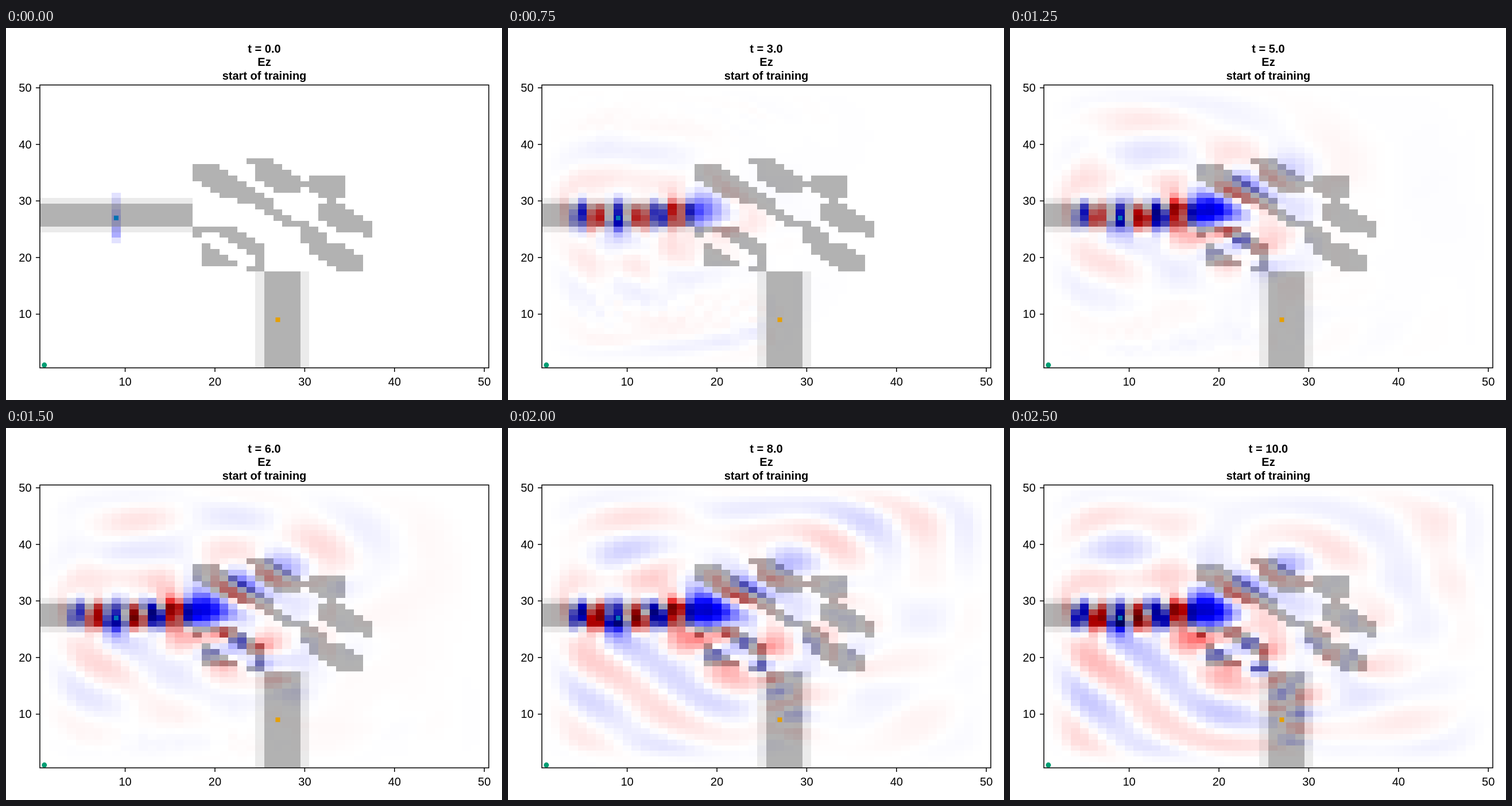
An HTML page with a canvas that plays this animation: 864x648 px, repeating every 2.56 s.

```html
<!DOCTYPE html>
<html>
<head>
<meta charset="utf-8">
<style>
  html, body { margin: 0; width: 100%; height: 100%; overflow: hidden; background: #fff; }
  canvas { display: block; }
</style>
</head>
<body>
<canvas id="stage" width="864" height="648"></canvas>
<script>
// 2D wave simulation (Ez polarisation) of a waveguide bend on a 50 x 50 grid.
const SIZE = 50, PAD = 5, N = SIZE + 2 * PAD;
const STEPS = 24;              // time steps per period
const SPEED = 10.3 / STEPS;    // cells per step in the background
const FRAMES = 41, LOOP = 2560;
const CORE = 0.3, CLAD = 0.078;  // shade of the material overlay

// Islands of the design region: top row, then the cell span of each row going down.
const islands = [
  [36, '18-20 18-21 18-22 19-23 20-24 21-25 23-26 25-26 26-27 27-28 28-30 30-31 30-32 30-32 31-34 31-35 32-36 33-36 34-36'],
  [37, '24-26 25-27 25-28 25-29 26-30 27-29'],
  [34, '31-34 31-34 31-34 32-34 33-33 32-34 32-35 32-36 33-37 34-37 37-37'],
  [25, '18-22 21-23 22-24 23-25 24-25 25-25 25-25 24-25'],
  [24, '18-18'],
  [22, '19-19 19-20 19-21 19-22']
];

const at = (x, y) => (y + PAD - 1) * N + x + PAD - 1;
const shade = new Float32Array(N * N);
const damp = new Float32Array(N * N);
const eps = new Float32Array(N * N);

const guide = d => d < 2 ? CORE : d < 3 ? CLAD : 0;
for (let y = 1 - PAD; y <= SIZE + PAD; y++) {
  for (let x = 1 - PAD; x <= SIZE + PAD; x++) {
    const depth = p => Math.max(0, 4.5 - Math.min(p, SIZE + 1 - p));
    damp[at(x, y)] = Math.exp(-3 * (depth(x) + depth(y)) / STEPS);
    if (x <= 17) shade[at(x, y)] = guide(Math.abs(y - 27.5));
    if (y <= 17) shade[at(x, y)] = guide(Math.abs(x - 27.5));
  }
}
for (const [top, rows] of islands) {
  rows.split(' ').forEach((span, i) => {
    const [a, b] = span.split('-').map(Number);
    for (let x = a; x <= b; x++) shade[at(x, top - i)] = CORE;
  });
}
shade.forEach((s, k) => eps[k] = 1 + 4.44 * s / CORE);

function simulate() {
  const e = new Float32Array(N * N), hx = new Float32Array(N * N), hy = new Float32Array(N * N);
  const perFrame = STEPS / 4, fields = [];
  for (let n = 0; fields.length < FRAMES; n++) {
    for (let k = 0; k < N * N - N; k++) {
      hx[k] = (hx[k] - SPEED * (e[k + N] - e[k])) * damp[k];
      hy[k] = (hy[k] + SPEED * (e[k + 1] - e[k])) * damp[k];
    }
    for (let k = N; k < N * N; k++) {
      e[k] = (e[k] + SPEED / eps[k] * (hy[k] - hy[k - 1] - hx[k] + hx[k - N])) * damp[k];
    }
    for (let d = -4; d <= 4; d++) {
      const k = at(9, 27 + d);
      e[k] += 15 / STEPS / eps[k] * Math.exp(-d * d / 6.7) * Math.cos(2 * Math.PI * n / STEPS);
    }
    if (n % perFrame === 0) fields.push(e.slice());
  }
  return fields;
}

// Diverging map: dark blue, blue, white, red, dark red.
function color(v) {
  const m = Math.min(1, Math.abs(v));
  const pale = Math.max(0, 1 - 2 * m);
  const full = 1 - Math.max(0, m - 0.5) * (v > 0 ? 1.4 : 1);
  return v > 0 ? [pale, pale, full] : [full, pale, pale];
}

const fields = simulate();
const cells = document.createElement('canvas');
cells.width = cells.height = SIZE;
const cellCtx = cells.getContext('2d');
const image = cellCtx.createImageData(SIZE, SIZE);
const ctx = document.getElementById('stage').getContext('2d');

const box = { left: 59, top: 99.3, width: 782, height: 492.7 };
const px = x => box.left + (x - 0.5) * box.width / SIZE;
const py = y => box.top + box.height - (y - 0.5) * box.height / SIZE;

function text(string, x, y, align, weight = '') {
  ctx.font = weight + ' 20px "Liberation Sans", Arial, sans-serif';
  ctx.textAlign = align;
  ctx.fillStyle = '#000';
  ctx.fillText(string, x, y);
}

function square(x, y, fill) {
  ctx.fillStyle = fill;
  ctx.fillRect(px(x) - 4, py(y) - 4, 8, 8);
}

function drawField(field) {
  for (let y = 1; y <= SIZE; y++) {
    for (let x = 1; x <= SIZE; x++) {
      const k = at(x, y), p = ((SIZE - y) * SIZE + x - 1) * 4;
      color(field[k]).forEach((c, i) => image.data[p + i] = 255 * c * (1 - shade[k]));
      image.data[p + 3] = 255;
    }
  }
  cellCtx.putImageData(image, 0, 0);
  ctx.imageSmoothingEnabled = false;
  ctx.drawImage(cells, box.left, box.top, box.width, box.height);
}

function drawAxes() {
  ctx.strokeStyle = '#000';
  ctx.lineWidth = 1.5;
  ctx.strokeRect(box.left, box.top, box.width, box.height);
  ctx.beginPath();
  for (let v = 10; v <= 50; v += 10) {
    ctx.moveTo(px(v), 592);
    ctx.lineTo(px(v), 599);
    ctx.moveTo(59, py(v));
    ctx.lineTo(52, py(v));
    text(v, px(v), 623, 'center');
    text(v, 44.5, py(v) + 7, 'right');
  }
  ctx.stroke();
}

function draw(frame) {
  ctx.fillStyle = '#fff';
  ctx.fillRect(0, 0, 864, 648);
  drawField(fields[frame]);
  square(9, 27, '#0072b2');
  square(27, 9, '#e69f00');
  ctx.fillStyle = '#009e73';
  ctx.beginPath();
  ctx.arc(px(1), py(1), 4.5, 0, 7);
  ctx.fill();
  drawAxes();
  const t = frame / 4;
  text('t = ' + (Number.isInteger(t) ? t.toFixed(1) : t), 450, 42.5, 'center', 'bold');
  text('Ez', 450, 66, 'center', 'bold');
  text('start of training', 450, 89.5, 'center', 'bold');
}

let shown = -1;
function tick() {
  const ms = performance.now() % LOOP;
  const frame = Math.min(FRAMES - 1, Math.floor((ms + 3) / 62.5));
  if (frame !== shown) draw(shown = frame);
  requestAnimationFrame(tick);
}
tick();
</script>
</body>
</html>
```
